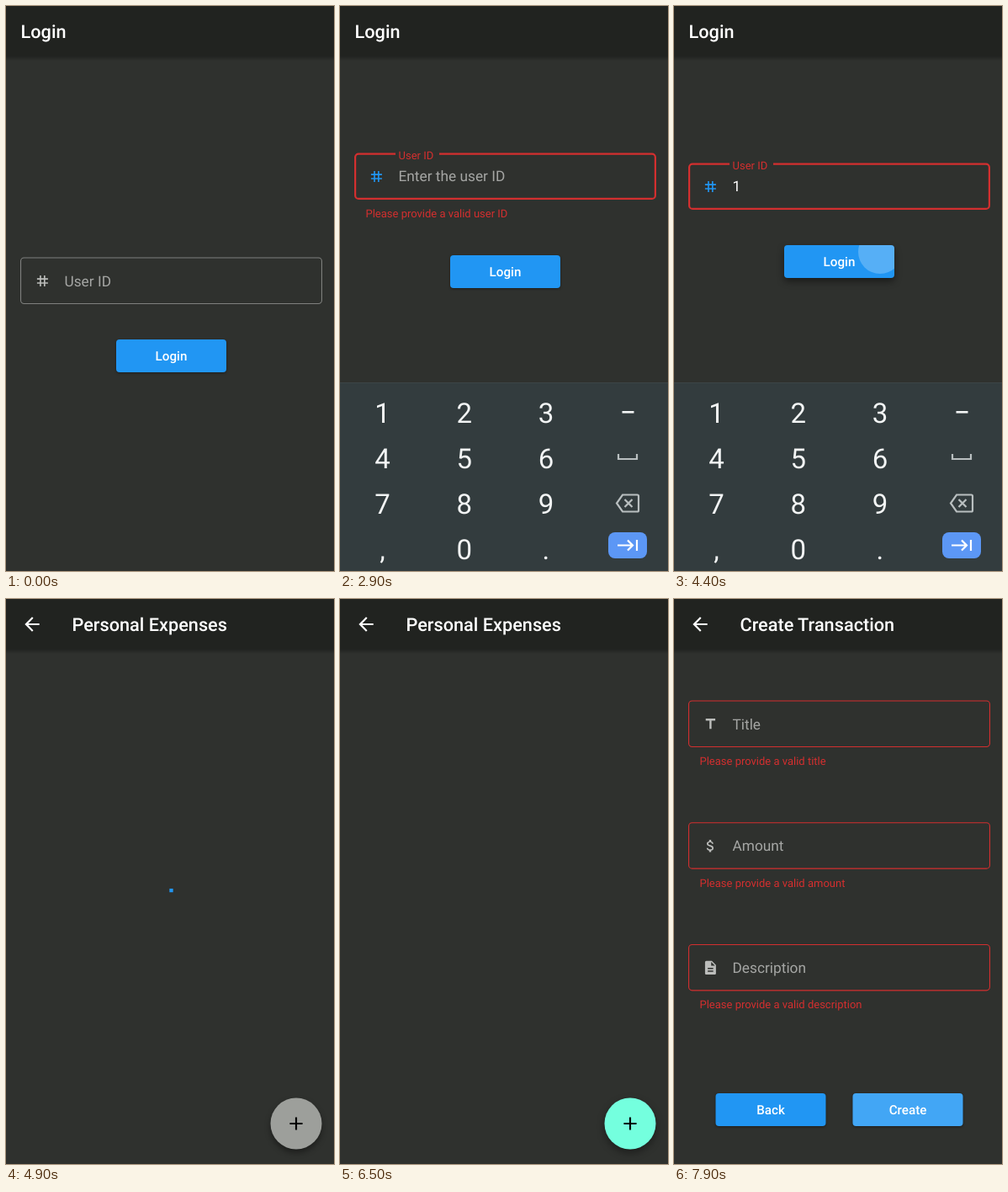
Recreate the animation shown at these times as an HTML page. Size 390 px wide and 671 px high, loop 8000 ms.

```html
<!DOCTYPE html>
<html>
<head>
<meta charset="utf-8">
<style>
html, body { margin: 0; width: 100%; height: 100%; overflow: hidden; background: #2f312e; }
svg { display: block; width: 390px; height: 671px; font-family: Roboto, sans-serif; text-rendering: geometricPrecision; }
</style>
</head>
<body>
<svg id="stage" viewBox="0 0 390 671"></svg>
<script>
const stage = document.getElementById('stage');
const LOOP = 8000, STEP = 100;
const BG = '#2f312e', RED = '#d32f2f', BLUE = '#2196f3', DIM = '#a5a6a4';

const ICONS = {
  tag: 'M20 10V8h-4V4h-2v4h-4V4H8v4H4v2h4v4H4v2h4v4h2v-4h4v4h2v-4h4v-2h-4v-4h4zm-6 4h-4v-4h4v4z',
  title: 'M5 4v3h5.5v12h3V7H19V4z',
  money: 'M11.8 10.9c-2.27-.59-3-1.2-3-2.15 0-1.09 1.01-1.85 2.7-1.85 1.78 0 2.44.85 2.5 2.1h2.21c-.07-1.72-1.12-3.3-3.21-3.81V3h-3v2.16c-1.94.42-3.5 1.68-3.5 3.61 0 2.31 1.91 3.46 4.7 4.13 2.5.6 3 1.48 3 2.41 0 .69-.49 1.79-2.7 1.79-2.06 0-2.87-.92-2.98-2.1h-2.2c.12 2.19 1.76 3.42 3.68 3.83V21h3v-2.15c1.95-.37 3.5-1.5 3.5-3.55 0-2.84-2.43-3.81-4.7-4.4z',
  doc: 'M14 2H6c-1.1 0-2 .9-2 2v16c0 1.1.9 2 2 2h12c1.1 0 2-.9 2-2V8l-6-6zm2 16H8v-2h8v2zm0-4H8v-2h8v2zm-3-5V3.5L18.5 9H13z',
  back: 'M20 11H7.83l5.59-5.59L12 4l-8 8 8 8 1.41-1.41L7.83 13H20v-2z',
  plus: 'M19 13h-6v6h-2v-6H5v-2h6V5h2v6h6v2z'
};

const clamp = v => Math.max(0, Math.min(1, v));
const ramp = (t, a, b) => clamp((t - a) / (b - a));

const rect = (x, y, w, h, r, attrs) =>
  `<rect x="${x}" y="${y}" width="${w}" height="${h}" rx="${r}" ${attrs}/>`;
const text = (s, x, y, size, fill, attrs = '') =>
  `<text x="${x}" y="${y}" font-size="${size}" fill="${fill}" ${attrs}>${s}</text>`;
const icon = (name, x, y, scale, fill) =>
  `<path d="${ICONS[name]}" fill="${fill}" fill-rule="evenodd" transform="translate(${x} ${y}) scale(${scale}) translate(-12 -12)"/>`;
const shadow = (dy, blur, a) => `style="filter:drop-shadow(0 ${dy}px ${blur}px rgba(0,0,0,${a}))"`;

function appBar(title, back) {
  return `<linearGradient id="fade" x2="0" y2="1"><stop stop-opacity=".32"/><stop offset="1" stop-opacity="0"/></linearGradient>`
    + rect(0, 59, 390, 6, 0, 'fill="url(#fade)"') + rect(0, 0, 390, 59, 0, 'fill="#212320"')
    + (back ? icon('back', 31, 30, 1.083, '#fff') : '')
    + text(title, back ? 78.5 : 17.5, 38, 21.7, '#fff', 'font-weight="500"');
}

// Outlined text field; y is its top edge
function field(y, glyph, label, o = {}) {
  const edge = o.color || (o.error ? RED : '#7f807e');
  const w = o.focus ? 2.2 : 1.08;
  let s = rect(17 + w / 2, y + w / 2, 359 - w, 55.5 - w, 4, `fill="none" stroke="${edge}" stroke-width="${w}"`)
    + icon(glyph, 43.4, y + 28, .8125, o.focus ? BLUE : '#bcbdbb');
  if (o.focus) {
    s += rect(66, y - 2, 52, 6, 0, `fill="${BG}"`) + text(label, 69.5, y + 7.5, 13, edge)
      + (o.value ? text(o.value, 69.5, y + 33, 17.3, '#fff') : text(o.hint, 69.5, y + 33, 17.3, DIM));
  } else s += text(label, 69.5, y + 34, 17.3, DIM);
  if (o.error) s += text(o.error, 30.5, y + 76.5, 13, RED, `opacity="${o.fade}"`);
  return s;
}

function button(x, y, label, r = 0, a = 0, raised = false) {
  const id = 'clip' + label;
  return rect(x, y, 131, 39, 4, `fill="${BLUE}" ` + (raised ? shadow(4, 4, .45) : shadow(1.5, 1.5, .4)))
    + `<clipPath id="${id}">${rect(x, y, 131, 39, 4, '')}</clipPath>`
    + (r ? `<circle cx="${x + 114}" cy="${y + 8}" r="${r}" fill="#fff" opacity="${a}" clip-path="url(#${id})"/>` : '')
    + text(label, x + 65.5, y + 25, 15.2, '#fff', 'font-weight="500" text-anchor="middle"');
}

function keyboard(dy, pressed) {
  let s = rect(0, 447, 390, 224, 0, 'fill="#333c3e"') + rect(0, 447, 390, 1, 0, 'fill="#3c4547"');
  if (pressed) s += rect(2, 457, 97, 51, 6, 'fill="#4d5659"');
  [...'123456789,0.'].forEach((c, i) => {
    s += text(c, 50.5 + i % 3 * 97.2, 494.5 + Math.floor(i / 3) * 54, 33, '#f3f5f5', 'text-anchor="middle"');
  });
  s += rect(335.5, 481, 14, 2.6, 0, 'fill="#f3f5f5"')
    + `<g fill="none" stroke="#b9bfc0" stroke-width="2.2">
      <path d="M331 532v6h22v-6"/>
      <path d="M336 580.5h17.5q1.5 0 1.5 1.5v17q0 1.500-1.500 1.500H336l-7-10z"/>
      <path d="M338.500 586l9 9m0-9l-9 9"/></g>`
    + rect(319, 625, 46, 31, 8, 'fill="#5c97f5"')
    + '<path d="M330 640.500h18m-6-6l6 6-6 6M353 634v13" fill="none" stroke="#fff" stroke-width="2.200"/>';
  return `<g transform="translate(0 ${dy})">${s}</g>`;
}

function login(t) {
  const focus = t >= 2900, typing = focus && t < 4500;
  const error = t >= 1200 && t < 4300;
  const y = (typing ? 186.5 : 298.5) - (error ? 12 : 0);
  let r = 0, a = 0;
  if (t >= 1100 && t < 1900) {
    r = 20 + 110 * ramp(t, 1100, 1300);
    a = .15 * (1 - ramp(t, 1400, 1900));
  } else if (t >= 4300) {
    r = t < 4500 ? 16 + (t - 4300) / 10 : 60 + 70 * ramp(t, 4500, 4600);
    a = .24 * (1 - ramp(t, 4500, 4900));
  }
  return field(y, 'tag', 'User ID', {
      focus, hint: 'Enter the user ID', value: t >= 3400 ? '1' : '',
      color: focus ? (t < 4500 ? RED : BLUE) : '',
      error: error && 'Please provide a valid user ID', fade: .5 + .5 * ramp(t, 1200, 1300)
    })
    + button(131, y + (error ? 121.5 : 97.5), 'Login', r, a, t >= 4300 && t < 4600)
    + appBar('Login')
    + (focus && t < 4700 ? keyboard(224 * ramp(t, 4400, 4700), t >= 3300 && t < 3400) : '');
}

// Fast-out-slow-in: cubic Bezier (.4, 0, .2, 1)
function ease(x) {
  let lo = 0, hi = 1;
  for (let i = 0; i < 20; i++) {
    const u = (lo + hi) / 2, v = 1 - u;
    if (1.2 * v * v * u + .6 * v * u * u + u ** 3 < x) lo = u; else hi = u;
  }
  return lo * lo * (3 - 2 * lo);
}

function spinner(ms) {
  const p = ms % 1333 / 1333;
  const head = ease(clamp(p * 2)), tail = ease(clamp(p * 2 - 1));
  const start = Math.PI * (-.5 + 1.5 * tail + 2 * (ms % 2222) / 2222 + .5 * p);
  const sweep = Math.max(1.5 * Math.PI * (head - tail), .001);
  const pt = a => `${196.5 + 19.4 * Math.cos(a)} ${365.5 + 19.4 * Math.sin(a)}`;
  return `<path d="M${pt(start)}A19.4 19.4 0 ${sweep > Math.PI ? 1 : 0} 1 ${pt(start + sweep)}" fill="none" stroke="${BLUE}" stroke-width="4.3" stroke-linecap="square"/>`;
}

function expenses(t) {
  const loading = t < 5500, pressed = t >= 6100;
  return appBar('Personal Expenses', true)
    + (loading ? spinner(t - 4900) : '')
    + `<circle cx="345" cy="623" r="30.5" fill="${loading ? '#9d9f9b' : '#64ffda'}" ${shadow(4, pressed ? 5 : 3.5, .4)}/>`
    + (pressed ? `<circle cx="345" cy="623" r="${10 + 20.5 * ramp(t, 6100, 6400)}" fill="#fff" opacity=".1"/>` : '')
    + icon('plus', 345, 623, 1.083, '#000');
}

function create(t) {
  const bad = t >= 7600;
  const rows = [['title', 'Title'], ['money', 'Amount'], ['doc', 'Description']];
  return appBar('Create Transaction', true)
    + rows.map(([glyph, name], i) => field((bad ? 120.5 : 132.5) + 144.7 * i, glyph, name, {
        error: bad && 'Please provide a valid ' + name.toLowerCase(), fade: .5 + .5 * ramp(t, 7600, 7700)
      })).join('')
    + button(49.5, 587, 'Back')
    + button(212.5, 587, 'Create', t < 7300 ? 0 : 40 + 100 * ramp(t, 7300, 7400), .15);
}

function draw(now) {
  const t = Math.floor(now % LOOP / STEP) * STEP;
  if (t !== draw.last) {
    const page = t < 4900 ? login : t < 6600 ? expenses : create;
    stage.innerHTML = rect(0, 0, 390, 671, 0, `fill="${BG}"`) + page(t);
    draw.last = t;
  }
  requestAnimationFrame(draw);
}
draw(0);
</script>
</body>
</html>
```
